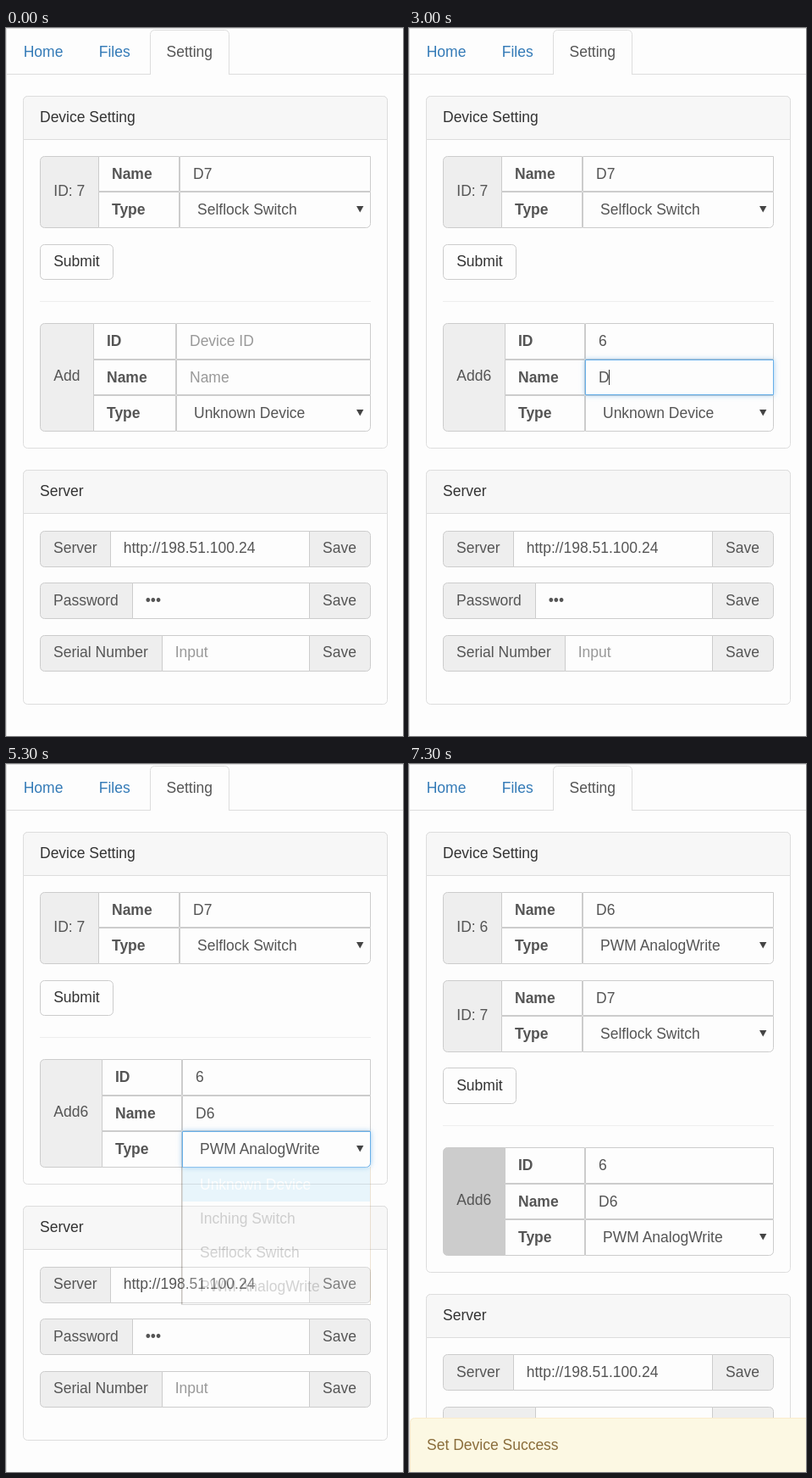
These frames come from a looping animation (469x835 px, 8000 ms). An HTML page:

```html
<!DOCTYPE html>
<html lang="en">
<head>
<meta charset="utf-8">
<title>Device settings</title>
<style>
  html, body { margin: 0; width: 100%; height: 100%; overflow: hidden; background: #fdfdfd; }
  svg { display: block; width: 100%; height: 100%; }
  text { font: 17.5px "Liberation Sans", Arial, sans-serif; fill: #555; white-space: pre; }
  .bold { font-weight: bold; }
  .dark { fill: #333; }
  .link { fill: #337ab7; }
  .hint { fill: #999; }
  .white { fill: #fff; }
  .alert { fill: #8a6d3b; }
  .glow { filter: drop-shadow(0 0 3px rgba(102, 175, 233, .6)); }
</style>
</head>
<body>
<svg id="stage" viewBox="0 0 469 835"></svg>
<script>
const LOOP = 8000;
const ROW_SHIFT = 103.75;
const WHITE = '#fdfdfd', GREY = '#eee', BORDER = '#ccc', PANEL = '#ddd', FOCUS = '#66afe9';
const stage = document.getElementById('stage');

const text = (x, y, str, cls = '') => `<text x="${x}" y="${Math.round(y)}" class="${cls}">${str}</text>`;
const fillRect = (x, y, w, h, fill) => `<rect x="${x}" y="${y}" width="${w}" height="${h}" fill="${fill}"/>`;
const arrow = y => `<path d="M414 ${y}h8.4l-4.2 7.4z" fill="#444"/>`;

// Bordered box with one-pixel lines just inside its edges; corners: tl, tr, br, bl
function box(x1, y1, x2, y2, fill, stroke = BORDER, corners = [0, 0, 0, 0], attrs = '') {
  const [l, t, r, b] = [x1 + .5, Math.round(y1) + .5, x2 - .5, Math.round(y2) - .5];
  const [tl, tr, br, bl] = corners;
  return `<path d="M${l + tl} ${t}H${r - tr}a${tr} ${tr} 0 0 1 ${tr} ${tr}V${b - br}` +
    `a${br} ${br} 0 0 1 ${-br} ${br}H${l + bl}a${bl} ${bl} 0 0 1 ${-bl} ${-bl}V${t + tl}` +
    `a${tl} ${tl} 0 0 1 ${tl} ${-tl}z" fill="${fill}" stroke="${stroke}" ${attrs}/>`;
}
const ROUND = [5, 5, 5, 5], LEFT = [5, 0, 0, 5], RIGHT = [0, 5, 5, 0], LOW_RIGHT = [0, 0, 5, 0];

function panel(y1, y2, title) {
  return box(20, y1, 451, y2, WHITE, PANEL, ROUND) +
    box(20, y1, 451, y1 + 52, '#f7f7f7', PANEL, [5, 5, 0, 0]) +
    text(40, y1 + 31.4, title, 'dark');
}

// Label column plus stacked fields; field = { label, value, hint, select, focus }
function group(y, name, labelX, fieldX, fields, fill = GREY) {
  const edges = fields.length === 2 ? [0, 42, 85] : [0, 43, 85, 128];
  const last = fields.length - 1;
  const corner = i => i === last ? LOW_RIGHT : undefined;
  let cells = '', glows = '', labels = '';
  fields.forEach((f, i) => {
    const top = y + edges[i], bottom = y + edges[i + 1], base = y + edges[i] + 27;
    cells += box(labelX, top, fieldX, bottom, WHITE) + box(fieldX, top, 431, bottom, WHITE, BORDER, corner(i));
    if (f.focus) glows += box(fieldX, top, 431, bottom, WHITE, FOCUS, corner(i), `class="glow" opacity="${f.focus}"`);
    labels += text(labelX + 16, base, f.label, 'bold') +
      text(fieldX + (f.select ? 21 : 16), base, f.value || f.hint, f.value ? '' : 'hint');
    if (f.select) labels += arrow(Math.round(top) + 17);
  });
  return box(40, y, labelX + 1, y + edges[last + 1], fill, BORDER, LEFT) + cells + glows +
    text(56.3, y + edges[last + 1] / 2 + 4.4, name) + labels;
}

const deviceGroup = (y, id, type) => group(y, `ID: ${id}`, 109, 205, [
  { label: 'Name', value: `D${id}` },
  { label: 'Type', value: type, select: true }
]);

function serverRow(y, label, split, value, cls) {
  const base = Math.round(y + .3) + 26;
  return box(split, y, 359, y + 43, WHITE) +
    box(40, y, split + 1, y + 43, GREY, BORDER, LEFT) +
    box(358, y, 431, y + 43, GREY, BORDER, RIGHT) +
    text(56, base, label) + text(split + 15.7, base, value, cls) + text(374, base, 'Save');
}

function dropdown(opacity) {
  const items = ['Unknown Device', 'Inching Switch', 'Selflock Switch', 'PWM AnalogWrite'];
  return `<g opacity="${opacity}">` + fillRect(207, 475, 224, 163, WHITE) +
    fillRect(208, 476, 222, 40, '#aee0f6') +
    fillRect(207, 475, 1.5, 163, '#2b1d0c') + fillRect(430, 475, 1, 163, '#c0975a') +
    fillRect(207, 637, 224, 1, '#666') +
    items.map((item, i) => text(229, 502 + 40 * i, item, i ? '' : 'white')).join('') + '</g>';
}

// Two-step fade in and out of the focus ring
function focusLevel(t, from, to) {
  const ramp = start => Math.max(0, Math.min(1, (Math.floor((t - start) / 100) + 1) / 2));
  return t >= 7200 ? 0 : ramp(from) - ramp(to);
}

// Caret: from, to, x, y
const CARETS = [
  [900, 1300, 217, 361], [1800, 2300, 234, 361],
  [2300, 2800, 225, 403], [3000, 3400, 236, 403], [3400, 3900, 246, 403]
];

function scene(t) {
  const typed = t >= 1800, done = t >= 7300;
  const shift = done ? ROW_SHIFT : 0;
  const type = t >= 5300 ? 'PWM AnalogWrite' : 'Unknown Device';
  const hrY = Math.round(322 + shift);

  let out = fillRect(0, 0, 469, 835, WHITE) + fillRect(0, 0, 469, 1, PANEL) + fillRect(0, 0, 1, 835, PANEL) +
    fillRect(0, 54, 469, 1, PANEL) + box(170, 2, 264, 60, WHITE, PANEL, [5, 5, 0, 0]) +
    fillRect(169, 55, 96, 6, WHITE) +
    text(20.7, 34, 'Home', 'link') + text(109.7, 34, 'Files', 'link') + text(189.5, 34, 'Setting');

  out += panel(80, 496 + shift, 'Device Setting');
  if (done) out += deviceGroup(151, 6, type);
  out += deviceGroup(151 + Math.round(shift), 7, 'Selflock Switch') +
    box(40, 254.6 + shift, 127, 296.9 + shift, WHITE, BORDER, ROUND) +
    text(56.2, 281 + shift, 'Submit', 'dark') +
    fillRect(40, hrY, 391, 1, '#eee');

  out += panel(Math.round(521 + shift), 798 + shift, 'Server') +
    serverRow(592.6 + shift, 'Server', 123, 'http://198.51.100.24') +
    serverRow(654.2 + shift, 'Password', 149, '•••') +
    serverRow(715.7 + shift, 'Serial Number', 184, 'Input', 'hint');

  out += group(348 + Math.round(shift), typed ? 'Add6' : 'Add', typed ? 113 : 103, typed ? 208 : 201, [
    { label: 'ID', value: typed ? '6' : '', hint: 'Device ID', focus: focusLevel(t, 900, 2300) },
    { label: 'Name', value: t >= 3400 ? 'D6' : t >= 3000 ? 'D' : '', hint: 'Name', focus: focusLevel(t, 2300, 3900) },
    { label: 'Type', value: type, select: true, focus: focusLevel(t, 3900, 7200) }
  ], t >= 7200 ? '#ccc' : GREY);

  const caret = CARETS.find(([from, to]) => t >= from && t < to);
  if (caret) out += fillRect(caret[2], caret[3], 1, 18, '#333');
  if (t >= 4000 && t < 5400) out += dropdown(t < 5300 ? 1 : .25);
  if (t >= 7200) {
    out += box(1, 771, 475, 841, '#fcf8e3', '#faebcc', ROUND) +
      text(21, 809, done ? 'Set Device Success' : 'Setting Device ...', 'alert');
  }
  return out;
}

let shown = '';
function frame() {
  const next = scene(performance.now() % LOOP);
  if (next !== shown) stage.innerHTML = shown = next;
  requestAnimationFrame(frame);
}
frame();
</script>
</body>
</html>
```
